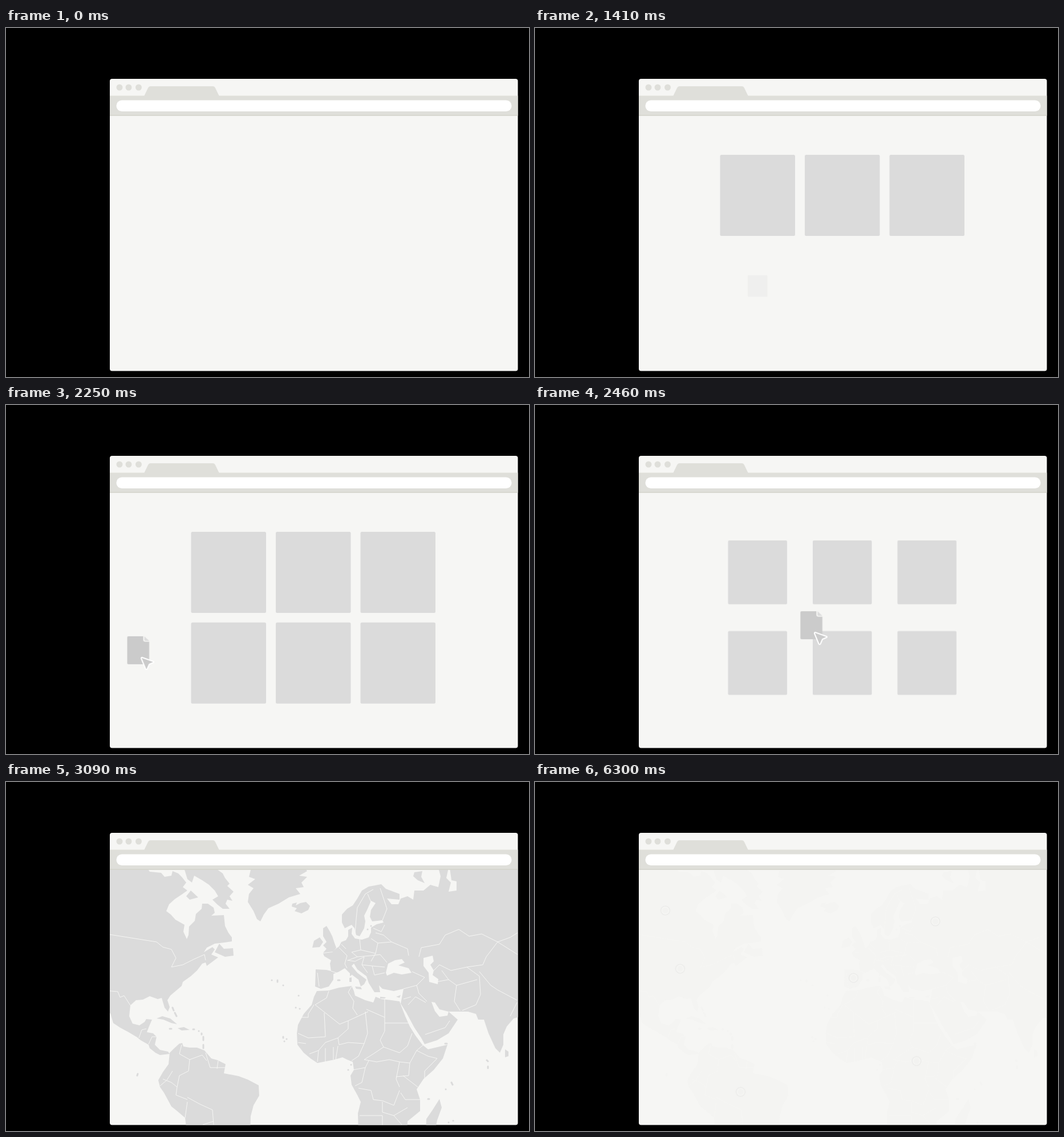
These frames come from a looping animation (917x611 px, 6360 ms). An HTML page:

```html
<!DOCTYPE html>
<html lang="en">
<head>
<meta charset="utf-8">
<title>Drop a file, get a map</title>
<style>
  html, body { margin: 0; width: 100%; height: 100%; overflow: hidden; background: #000; }
  svg { display: block; width: 917px; height: 611px; }

  .loader, .box, .shrink, .file, .drag, .cursor, .held, .map, .dots, .dot {
    animation: 6360ms linear infinite both;
  }
  .box, .shrink, .dot, .file { transform-box: fill-box; transform-origin: center; }

  .loader { animation-name: load; fill: none; stroke: #cbcbcb; stroke-width: 6; }
  @keyframes load {
    0%, .16% { stroke-dasharray: 0 100; stroke-dashoffset: 0; opacity: 1; }
    7.5% { stroke-dasharray: 100 100; stroke-dashoffset: 0; }
    14.6% { stroke-dasharray: 100 100; stroke-dashoffset: -100; opacity: 1; }
    14.61%, 100% { stroke-dasharray: 0 100; stroke-dashoffset: 0; opacity: 0; }
  }

  /* Tiles pop up one after another, then shrink together */
  .box { animation-name: box; animation-delay: calc(1150ms + var(--i) * 80ms); fill: #dbdbdb; }
  @keyframes box {
    0% { transform: scale(0); opacity: 0; }
    1.258%, 60% { transform: none; opacity: 1; }
    60.01%, 100% { transform: scale(0); opacity: 0; }
  }
  .shrink { animation-name: shrink; }
  @keyframes shrink {
    0%, 37.89% { transform: scale(1); opacity: 1; }
    41.67% { transform: scale(0); opacity: 1; }
    41.68%, 99.9% { transform: scale(0); opacity: 0; }
    100% { transform: scale(1); opacity: 0; }
  }

  .file { animation-name: file; }
  @keyframes file {
    0%, 25.79% { transform: scale(0); opacity: 0; }
    28.46%, 100% { transform: scale(1); opacity: 1; }
  }
  .drag { animation-name: drag; }
  @keyframes drag {
    0%, 32.23% { transform: none; animation-timing-function: cubic-bezier(.37, 0, .63, 1); }
    40.57%, 100% { transform: translate(444.5px, -77px); }
  }
  .held { animation-name: held; }
  @keyframes held {
    0%, 40.57% { opacity: 1; }
    42.45%, 100% { opacity: 0; }
  }
  .cursor { animation-name: cursor; stroke: #fff; stroke-width: 2; stroke-linejoin: round; }
  @keyframes cursor {
    0%, 28.53% { transform: translate(172px, 570px); opacity: 0; fill: #f6f6f4; }
    28.54% { transform: translate(172px, 570px); opacity: 1; fill: #f6f6f4; }
    29.25% { transform: translate(169px, 565px); fill: #f1f1f0; animation-timing-function: ease-out; }
    31.92%, 100% { transform: translate(98px, 466px); opacity: 1; fill: #cbcbcb; }
  }

  .map { animation-name: map; transform-origin: 540px 377px; }
  @keyframes map {
    0%, 40.88% { transform: scale(0); opacity: 0; animation-timing-function: ease-out; }
    48.58%, 96.93% { transform: none; opacity: 1; }
    99.23%, 100% { transform: none; opacity: 0; }
  }
  .land { fill: #dbdbdb; }
  .water { fill: #f6f6f4; }
  .borders { fill: none; stroke: #f6f6f4; stroke-width: 1; stroke-linejoin: round; }
  .islets { fill: none; stroke: #dbdbdb; stroke-width: 3; stroke-linecap: round; }

  .dots { animation-name: dots; }
  @keyframes dots {
    0%, 50% { opacity: 0; }
    50.01%, 96.93% { opacity: 1; }
    99.23%, 100% { opacity: 0; }
  }
  .dot { animation-name: dot; animation-delay: calc(3590ms + var(--i) * 120ms); }
  @keyframes dot {
    0% { transform: scale(0); }
    4.717%, 45% { transform: none; }
    45.01%, 100% { transform: scale(0); }
  }
</style>
</head>
<body>
<svg viewBox="0 0 917 611">
  <defs>
    <clipPath id="page"><path d="M182 153.500H897.500V597Q897.500 600.500 894 600.500H185.500Q182 600.500 182 597Z"/></clipPath>
    <g id="pin">
      <circle r="7.8" fill="#f8f8f7" stroke="#666" stroke-width="1.5"/>
      <circle r="5.4" fill="#c6c6c6"/>
    </g>
  </defs>

  <rect x="182" y="89" width="715.500" height="511.500" rx="4" fill="#f6f6f4"/>

  <g clip-path="url(#page)">
    <g class="map">
      <g class="land">
        <path d="M140 150H247L252 157L272 159L278 166L290 164L292 156L302 160L308 166L316 176L310 184L318 190L308 197L296 205L286 214L281 226L289 232L297 241L313 250L311 262L317 275L320 268L321 253L331 243L333 231L343 222L344 213L354 213L364 220L366 229L360 234L382 233L384 252L390 264L396 272L396 279L383 281L366 283L352 290L347 298L362 289L366 293L360 302L372 307L364 313L352 322L350 316L344 318L335 330L324 340L310 350L308 357L288 374L283 382L287 394L284 402L278 395L273 378L266 380L252 375L240 381L228 382L218 391L216 410L222 423L234 426L243 420L246 415L256 416L250 430L247 438L258 440L264 446L261 460L270 469L284 472L287 476L270 478L262 474L252 466L250 460L236 452L230 447L215 438L200 430L188 422L183 405L140 380Z"/>
        <path d="M312 150H366L380 160L384 168L392 178L388 182L399 192L392 200L397 208L388 206L385 213L392 222L380 222L370 214L362 206L372 200L366 190L356 180L344 172L330 164L326 176L318 170Z"/>
        <path d="M316 200L324 190L337 202L322 206Z"/>
        <path d="M366 298L374 283L382 292L398 291L399 304L384 306Z"/>
        <path d="M430 150L426 166L437 170L424 180L434 186L426 196L424 210L434 226L440 240L446 244L452 232L460 221L478 213L496 202L516 196L508 186L522 184L518 176L528 166L514 164L528 156L524 150Z"/>
        <path d="M502 213L510 211L508 216L516 212L526 210L533 217L530 224L518 230L506 226L510 221L501 218Z"/>
        <path d="M287 474L294 467L304 458L309 457L311 463L322 465L335 465L348 470L360 484L371 487L385 494L382 510L408 515L424 521L443 531L444 549L434 566L429 585L428 620H318L314 588L300 576L290 568L277 544L270 534L267 522L275 508L285 494Z"/>
        <path d="M264 414L274 410L288 414L300 424L290 422L276 416ZM301 431L312 429L322 434L308 435Z"/>
        <path d="M543 328L562 329L570 331L568 318L570 312L558 305L556 300L572 298L578 292L584 288L588 280L596 277L600 270L600 259L607 255L606 266L612 274L624 276L636 272L640 263L640 255L650 249L662 246L660 242L642 244L638 236L640 224L648 212L640 208L634 222L628 234L630 244L628 256L620 270L614 268L611 256L606 250L594 256L589 246L589 232L598 222L608 216L616 204L624 190L636 183L658 179L666 187L690 196L690 206L668 204L676 214L688 214L692 204L704 200L714 206L716 190L732 190L744 180L758 184L762 165L758 150H776L772 168L780 176L776 192L790 190L790 174L781 172L778 150H940V400L890 414L878 428L872 442L872 460L866 474L858 466L846 440L838 416L828 416L824 406L810 402L776 402L792 416L776 440L756 452L734 459L728 448L716 430L702 404L692 388L697 362L680 366L660 362L648 350L648 341L654 356L656 368L646 368L636 352L632 340L616 328L610 318L606 322L616 334L632 346L628 354L622 358L618 346L602 334L594 326L584 332L574 336L574 346L566 358L552 362L542 358Z"/>
        <path d="M545 366L566 365L584 360L606 357L610 366L612 374L630 382L644 386L648 376L658 380L676 382L690 384L700 410L708 428L718 444L730 460L740 468L774 460L766 484L750 504L732 520L720 538L726 556L726 576L704 594L703 620H618L617 580L622 560L616 548L606 530L604 514L610 504L608 490L598 486L590 482L576 486L546 492L534 484L522 474L511 460L510 440L512 425L522 406L536 390L540 376Z"/>
        <path d="M556 256L562 252L568 262L572 270L576 282L579 290L574 297L556 299L562 292L556 286L562 280L556 270ZM540 278L550 272L556 280L550 289L537 290Z"/>
        <path d="M736 620L737 590L748 574L760 555L764 570L756 592L750 620ZM716 158L730 156L728 166L734 177L722 172L714 165ZM875 468L881 472L881 480L875 482Z"/>
        <path d="M603 334L606 332V338L603 340ZM602 343L606 342V350L602 350ZM612 358L622 359L624 363L614 362ZM656 376L666 377L664 379H656ZM684 376L692 373L690 378Z"/>
      </g>
      <g class="water">
        <path d="M666 334L670 318L682 312L694 310L699 316L688 321L706 326L711 334L694 337L680 334L668 339Z"/>
        <path d="M732 308L748 304L750 314L744 320L750 330L748 338L758 345L757 354L742 350L741 334L732 322Z"/>
        <path d="M746 385L752 386L760 398L776 402L774 409L760 411L752 401Z"/>
      </g>
      <path class="borders" d="M140 262L182 267L264 280L275 289L290 293L298 308L290 324L310 320L330 310L348 302L350 312M140 362L196 367L200 377L207 374L218 391M233 448L238 434L246 432M250 459L256 446L264 446"/>
      <path class="borders" d="M308 460L304 476L322 486L320 506L304 514L300 534M322 486L344 478L352 488M350 474L358 500L384 500M372 488L370 502M275 520L290 526L300 534L298 548L318 556M318 552L340 564L362 574L364 600M314 588L318 560M345 600L364 594M270 532L282 522L292 506"/>
      <path class="borders" d="M566 366L562 378L542 390L585 424L600 418L635 402M540 390L530 406V412H518M606 358L600 368L610 384L608 396L616 408M664 380V422H706M664 412L632 398M664 422V436L656 452L662 464L644 476L628 486M558 404L560 446L530 448L512 440M600 418V432L582 448L560 456L548 470L532 476M582 448L584 460L600 456L628 458L634 440L630 402M582 462L578 486M574 464V486M560 466V490M548 470L546 490M512 456L526 458M628 458L618 480L606 488"/>
      <path class="borders" d="M628 486L650 490L672 486L690 490L708 492L720 470L732 460M662 464L690 474L704 462L712 440M690 490L684 520L690 534M696 514L722 534M708 492L706 514L684 516M608 504L630 500L636 488M630 500L624 526L612 532M618 536L640 540L644 556L660 558L680 566L690 540M620 584L660 584V620M660 560V578L680 584L704 570M726 556L700 556L692 544M720 470L740 480L756 484L734 506V520M680 584L694 600"/>
      <path class="borders" d="M724 306L728 290L760 284L770 268L794 258L812 270L834 266L862 280L884 272L897 264M862 280L842 306L836 320L808 324L780 330L760 320L750 330M830 332L850 356L862 364L896 382M754 350L776 346L790 356L786 384L796 400M790 356L826 346M800 400L824 390L832 372L830 340L808 324M776 346L764 330M862 280L897 302M697 362L720 356L734 342L712 332M720 356L724 370L738 384M705 390L718 376L736 386M697 380L710 376M735 442L770 430L778 418M896 386L884 410"/>
      <path class="borders" d="M570 331L582 335M546 334L549 358M584 290L598 304L594 318L598 326M588 284L596 292M620 274L622 294L606 298L616 306L600 312M622 294L648 300L652 282L640 274M648 264L662 268L676 280L704 292L706 304M652 282L676 280M616 306L640 304L656 302L668 316M628 306L624 320L642 322L664 324M624 320L634 334M642 322L646 338L664 334M612 264L614 240L616 220L630 196L644 188M634 196L640 210M656 186L668 222L660 242M644 256L658 262L664 250M598 312L612 314L628 306M648 300L640 314"/>
      <path class="islets" d="M466 347h.1M476 347v3M486 356h.1M513 374h.1M508 395h.1M515 397h.1M486 446v2M492 450h.1M488 454h.1M231 511l-1 3M292 395l2 5M296 404l3 6M287 432h3M328 433h2M338 436h.1M343 440v2M346 446v6M346 460v6M770 458h3M843 487l2 2M845 498v3M781 526l2 4M771 538h.1M740 555h2M776 596h.1M784 593h.1M605 495h.1M600 504h.1M582 347h3M634 258h.1M640 252h.1"/>
    </g>

    <g class="dots">
      <g transform="translate(228.500 225)"><use class="dot" style="--i:0" href="#pin"/></g>
      <g transform="translate(254.500 327)"><use class="dot" style="--i:1" href="#pin"/></g>
      <g transform="translate(360.500 542.500)"><use class="dot" style="--i:2" href="#pin"/></g>
      <g transform="translate(558.500 343)"><use class="dot" style="--i:3" href="#pin"/></g>
      <g transform="translate(669 488.500)"><use class="dot" style="--i:4" href="#pin"/></g>
      <g transform="translate(702 244)"><use class="dot" style="--i:5" href="#pin"/></g>
    </g>
  </g>

  <g fill="#dfdfda">
    <circle cx="199" cy="104" r="5.500"/>
    <circle cx="215" cy="104" r="5.500"/>
    <circle cx="232.500" cy="104" r="5.500"/>
    <path d="M182 118.500H242.500L249 105Q250.500 102 253 102H363Q365.500 102 367 105L373.500 118.500H897.500V153H182Z"/>
  </g>
  <rect x="182" y="152.500" width="715.500" height="1.200" fill="#cdcdc5"/>
  <rect x="193.500" y="126.500" width="693" height="19.500" rx="9.750" fill="#fff"/>

  <circle class="loader" cx="537" cy="376.500" r="29" pathLength="100" transform="rotate(-90 537 376.500)"/>

  <g id="tiles"></g>

  <g class="held">
    <g class="drag">
      <g transform="translate(73.300 429)">
        <g class="file" fill="#cbcbcb">
          <path d="M2 0H28V6Q28 9.500 31.500 9.500H38.500V47Q38.500 49 36.500 49H2Q0 49 0 47V2Q0 0 2 0Z"/>
          <path d="M30 0L38.500 8H32Q30 8 30 6Z" fill="#ddd"/>
        </g>
      </g>
      <path class="cursor" d="M1.500 0L21 7Q23 8 21 9L14 12L10.500 20Q9 22.500 7.500 20L0 2Q-.5 -.5 1.500 0Z"/>
    </g>
  </g>
</svg>
<script>
  const tiles = document.getElementById('tiles');
  for (let i = 0; i < 6; i++) {
    const x = 324.5 + (i % 3) * 148.5;
    const y = 222 + Math.floor(i / 3) * 158.7;
    tiles.innerHTML += `<g class="shrink"><rect class="box" style="--i:${i}" x="${x}" y="${y}" width="131.500" height="142" rx="2.500"/></g>`;
  }
</script>
</body>
</html>
```
